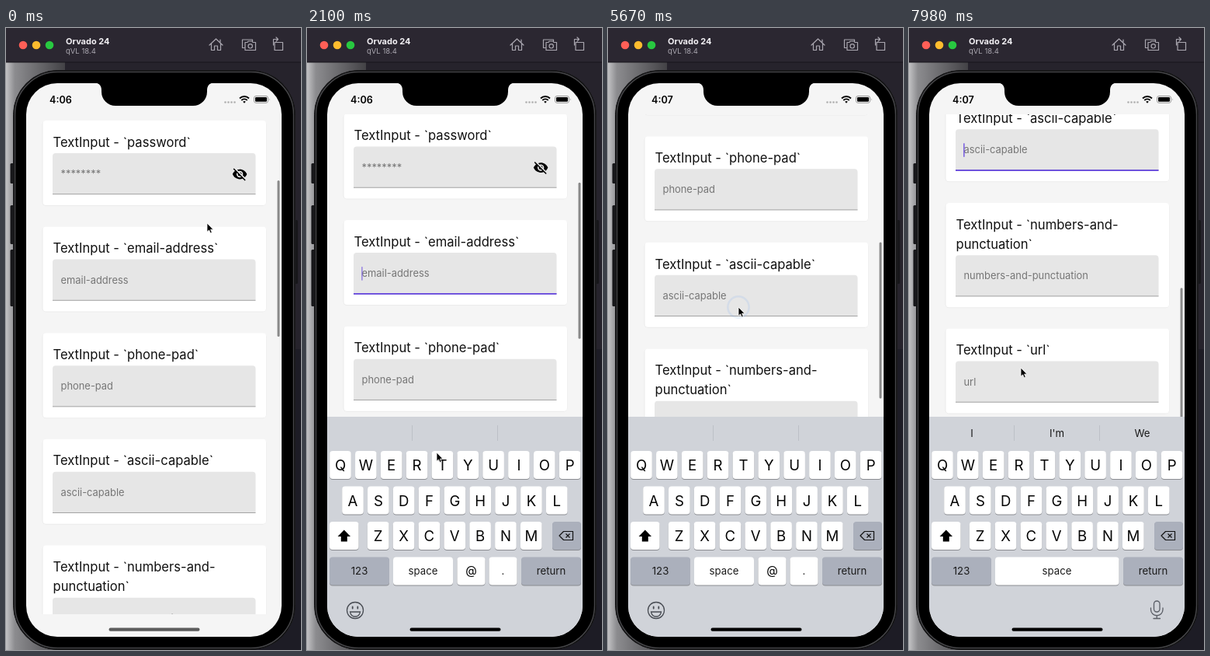
An HTML page for the animation above (8 s loop, 380 by 800 pixels).

```html
<!DOCTYPE html>
<html lang="en">
<head>
<meta charset="utf-8">
<title>Text input types</title>
<style>
  html, body { margin: 0; width: 100%; height: 100%; overflow: hidden; background: #1d1c25; }
  svg { display: block; width: 100vw; height: 100vh; }
  text { font-family: Inter, Roboto, sans-serif; }
  .title { font-size: 16.6px; fill: #111; }
  .hint { font-size: 12.9px; fill: #767676; }
  .letter { font-size: 18.6px; text-anchor: middle; fill: #050505; }
  .word { font-size: 13.2px; text-anchor: middle; fill: #1a1a1a; }
  .icon { fill: none; stroke: #aaa7b0; stroke-width: 1.2; stroke-linejoin: round; stroke-linecap: round; }
</style>
</head>
<body>
<svg viewBox="0 0 380 800">
  <defs>
    <linearGradient id="wall">
      <stop offset="0" stop-color="#c2c2c4"/><stop offset=".15" stop-color="#8c8c8f"/>
      <stop offset="1" stop-color="#434246"/>
    </linearGradient>
    <clipPath id="screen"><rect x="26" y="71" width="329" height="712" rx="40"/></clipPath>
    <clipPath id="list"><rect x="26" y="111" width="329" height="643"/></clipPath>
  </defs>

  <rect width="380" height="800" fill="#1d1c25"/>
  <rect width="76" height="800" fill="url(#wall)"/>
  <rect x="76" y="44" width="304" height="369" fill="#26232c"/>
  <rect width="380" height="44" fill="#2b2731"/>
  <path d="M0 44H380" stroke="#17151b"/>
  <circle cx="22" cy="22" r="5.300" fill="#ff5f57"/>
  <circle cx="39" cy="22" r="5.300" fill="#febc2e"/>
  <circle cx="56" cy="22" r="5.300" fill="#28c840"/>
  <text x="77" y="20.500" font-size="11" font-weight="700" fill="#f2f0f4">Orvado 24</text>
  <text x="77" y="32.500" font-size="9.500" fill="#aaa7b0">qVL 18.4</text>
  <g class="icon">
    <path d="M262 22L270.500 14L279 22M264.500 20V28.500H268.500V23H272.500V28.500H276.500V20M276 15V18"/>
    <path d="M307 25.500H304.500V15H317.500V17M308 18.500H311L312 17H317L318 18.500H321.500V28.500H308Z"/>
    <circle cx="314.700" cy="23.300" r="2.700"/>
    <path d="M346 18.500H356.500V28.500H346ZM344.500 22V14.500H350M348 12L350.500 14.500L348 17"/>
  </g>

  <g fill="#17171a">
    <rect x="5.500" y="174" width="6" height="26" rx="1.500"/>
    <rect x="5.500" y="228" width="6" height="50" rx="1.500"/>
    <rect x="5.500" y="285" width="6" height="73" rx="1.500"/>
    <rect x="370" y="247" width="6" height="82" rx="1.500"/>
  </g>
  <rect x="9.500" y="54.500" width="363" height="745" rx="57" fill="#000" stroke="#1c1c1e"/>
  <rect x="11.500" y="56.500" width="359" height="741" rx="55" fill="none" stroke="#464649" stroke-width="1.500"/>

  <g clip-path="url(#screen)">
    <rect x="26" y="71" width="329" height="712" fill="#f5f5f5"/>
    <g clip-path="url(#list)">
      <g id="cards"></g>
      <rect id="bar" x="349.500" width="3" height="201" rx="1.500" fill="#898989"/>
    </g>
    <g id="keyboard"></g>
    <rect id="home" x="132.500" y="771.600" width="117" height="4.200" rx="2.100"/>
    <path d="M111 70Q123 70 123 80V82A18 18 0 0 0 141 100H241A18 18 0 0 0 259 82V80Q259 70 271 70Z"/>
    <text id="clock" x="56" y="96.500" font-size="12.600" font-weight="600"></text>
    <g fill="#b0b0b0">
      <circle cx="282.500" cy="95.500" r="1.300"/><circle cx="286.500" cy="95.500" r="1.300"/>
      <circle cx="290.500" cy="95.500" r="1.300"/><circle cx="294.500" cy="95.500" r="1.300"/>
    </g>
    <g fill="none" stroke="#000" stroke-width="1.800">
      <path d="M301 90.500A8.500 8.500 0 0 1 313 90.500M303.300 93A5.300 5.300 0 0 1 310.700 93"/>
      <path d="M307 96.800L305.200 94.800Q307 93.400 308.800 94.800Z" fill="#000" stroke="none"/>
    </g>
    <rect x="319.500" y="87.500" width="18" height="8.800" rx="2.500" fill="none" stroke="#999"/>
    <rect x="321" y="89" width="15" height="5.800" rx="1.300"/>
    <path d="M339 90.300Q340.500 92 339 93.600Z" fill="#999"/>
  </g>

  <circle id="ring" fill="none" stroke="#82abf2" stroke-width="2.500"/>
  <path id="arrow" d="M0 0V11.200L2.600 8.900L4.300 12.800L6.300 12L4.600 8.200H8Z" stroke="#fff" stroke-width=".8"/>
</svg>

<script>
const LOOP = 8000;
const $ = id => document.getElementById(id);

// ---- cards ----
const EYE = `<path transform="translate(291 178) scale(.843)" d="M11.830 9L15 12.160V12a3 3 0 0 0-3-3h-.17m-4.300.8l1.550 1.550c-.05.210-.08.420-.08.650a3 3 0 0 0 3 3c.22 0 .44-.03.650-.08l1.550 1.550c-.67.330-1.410.530-2.200.530a5 5 0 0 1-5-5c0-.79.200-1.530.530-2.200M2 4.270l2.730 2.730C3.080 8.300 1.780 10 1 12c1.730 4.390 6 7.500 11 7.500 1.550 0 3.030-.3 4.380-.84l3.350 3.340L21 20.730 3.270 3M12 7a5 5 0 0 1 5 5c0 .64-.13 1.260-.36 1.820l2.930 2.930c1.500-1.250 2.700-2.890 3.430-4.750-1.730-4.390-6-7.500-11-7.500-1.400 0-2.740.250-4 .7l2.170 2.150C10.740 7.130 11.350 7 12 7z"/>`;

function card(type, y, { hint = type, lines = ['`' + type + '`'], extra = '' } = {}) {
  const top = y + 42 + (lines.length - 1) * 25.3;
  const titles = lines.map((s, i) =>
    `<text class="title" x="60.500" y="${y + 33.7 + i * 25.3}">${i ? '' : 'TextInput - '}${s}</text>`).join('');
  return `
    <rect x="46.500" y="${y}" width="289" height="${top - y + 68}" rx="5" fill="#ebebeb"/>
    <rect x="47.500" y="${y}" width="287.500" height="${top - y + 67}" rx="4" fill="#fff"/>
    ${titles}
    <path d="M60 ${top + 53}v-49q0-4 4-4h253.500q4 0 4 4v49z" fill="#e6e6e6"/>
    <path d="M60 ${top + 52.7}h261.500" stroke="#a3a3a3"/>
    <text class="hint" x="70.500" y="${top + 31}">${hint}</text>
    <g id="focus-${type}" fill="#5a38e0">
      <rect x="60" y="${top + 52}" width="261.500" height="1.600"/>
      <rect id="caret-${type}" x="70" y="${top + 18}" width="1.700" height="17.500"/>
    </g>${extra}`;
}

$('cards').innerHTML =
  card('password', 119, { hint: '********', extra: EYE }) +
  card('email-address', 255.6) +
  card('phone-pad', 392.2) +
  card('ascii-capable', 528.8) +
  card('numbers-and-punctuation', 665.4, { lines: ['`numbers-and-', 'punctuation`'] }) +
  card('url', 827);

// ---- keyboard ----
const cap = (x, y, w, fill = '#fff') =>
  `<rect x="${x}" y="${y + 1}" width="${w}" height="36" rx="4" fill="#8b8d92"/>
   <rect x="${x}" y="${y}" width="${w}" height="36" rx="4" fill="${fill}"/>`;
const label = (s, x, y, cls = 'word') => `<text class="${cls}" x="${x}" y="${y}">${s}</text>`;
const row = (s, x, y) => [...s].map((c, i) =>
  cap(x + i * 32.85 - 13.8, y, 27.6) + label(c, x + i * 32.85, y + 25, 'letter')).join('');
const GREY = '#abb0bc';

$('keyboard').innerHTML = `
  <rect x="26" y="500" width="329" height="300" fill="#d0d3d9"/>
  <path d="M135.500 511V531M245.500 511V531" stroke="#bcc0c7"/>
  ${row('QWERTYUIOP', 43, 544)}${row('ASDFGHJKL', 59, 589.5)}${row('ZXCVBNM', 91.7, 635)}
  ${cap(29, 635, 37.5)}${cap(316, 635, 37, GREY)}
  <path d="M47.800 645.500L56 654H51.800V660.500H43.800V654H39.600Z"/>
  <path d="M330.500 647.500H342.500V658.500H330.500L325 653ZM333.500 650.500L338.500 655.500M338.500 650.500L333.500 655.500" fill="none" stroke="#111" stroke-width="1.200" stroke-linejoin="round"/>
  ${cap(29, 680.5, 77, GREY)}${label('123', 67.5, 703)}
  ${cap(276, 680.5, 77, GREY)}${label('return', 314.5, 702.5)}
  <g id="emailKeys">
    ${cap(111, 680.5, 77)}${label('space', 149.5, 702.5)}
    ${cap(193.5, 680.5, 36)}<text x="211.500" y="703" font-size="15" text-anchor="middle">@</text>
    ${cap(234.5, 680.5, 36)}${label('.', 252.5, 703)}
    <g fill="none" stroke="#484c53" stroke-width="1.300">
      <circle cx="62" cy="749" r="10.500"/>
      <path d="M55.500 751H68.500Q67.500 757 62 757T55.500 751Z"/>
      <path d="M58.700 744.500V746.500M65.300 744.500V746.500" stroke-width="1.800" stroke-linecap="round"/>
    </g>
  </g>
  <g id="plainKeys">
    ${cap(111, 680.5, 159.5)}${label('space', 190.5, 702.5)}
    <g fill="none" stroke="#5a5e66" stroke-width="1.300" stroke-linecap="round">
      <rect x="315.500" y="737" width="7.500" height="14" rx="3.700"/>
      <path d="M311.500 746V748A7.700 7.700 0 0 0 327 748V746M319.200 756V759M315 759.500H323.500"/>
    </g>
  </g>
  <g id="words">${label('I', 81, 526)}${label("I'm", 190.5, 526)}${label('We', 300.5, 526)}</g>`;

// ---- motion ----
const clamp = v => Math.max(0, Math.min(1, v));
const ramp = (t, a, b) => clamp((t - a) / (b - a));
const smooth = u => u * u * (3 - 2 * u);
const show = (id, v) => $(id).setAttribute('opacity', +v);

// time, x, y
const PATH = [
  [0, 259, 251], [750, 143, 327], [1450, 143, 327], [2080, 167, 546], [2500, 168, 552],
  [3500, 177, 412], [3807, 177, 412], [4750, 179, 155], [4900, 179, 155], [5480, 168, 359],
  [5900, 168, 359], [6550, 178, 411], [6900, 178, 411], [7400, 176, 215], [7920, 144, 437], [LOOP, 144, 437]
];
const PRESSES = [[780, 900], [3760, 4780], [5645, 5790], [6860, 7420]];
const EMAIL = 930, ASCII = 5820;

function cursor(t) {
  const i = Math.max(1, PATH.findIndex(p => p[0] >= t));
  const a = PATH[i - 1], b = PATH[i], u = smooth(ramp(t, a[0], b[0]));
  return [a[1] + (b[1] - a[1]) * u, a[2] + (b[2] - a[2]) * u];
}

const scrollAt = t => 8.5 * (1 - Math.exp(-t / 300))
  + 244.5 * smooth(ramp(t, 3807, 4750))
  + 187.5 * smooth(ramp(t, 6900, 7400));

function rise(t) {
  const s = Math.max(0, t - EMAIL) * .0113;
  return 290 * (1 + s) * Math.exp(-s);
}

function blink(t) {
  const p = (t % 1000) / 1000;
  return ramp(p, -.05, .25) * (1 - ramp(p, .5, .6)) + ramp(p, .95, 1.25);
}

function draw(t) {
  const scroll = scrollAt(t), plain = t >= ASCII + 60;
  $('cards').setAttribute('transform', `translate(0 ${-scroll})`);
  $('bar').setAttribute('y', 196 + .314 * scroll);
  show('bar', t < 3807 ? 1 - ramp(t, 2200, 2450) : t < 6900 ? 1 - ramp(t, 5690, 5950) : 1);

  for (const type of ['password', 'phone-pad', 'numbers-and-punctuation', 'url']) show('focus-' + type, 0);
  show('focus-email-address', t >= EMAIL && t < ASCII);
  show('focus-ascii-capable', t >= ASCII);
  show('caret-email-address', blink(t - EMAIL - 70 + LOOP));
  show('caret-ascii-capable', blink(t - ASCII + LOOP));

  $('keyboard').setAttribute('transform', `translate(0 ${rise(t)})`);
  show('emailKeys', !plain);
  show('plainKeys', plain);
  show('words', t >= ASCII + 200);
  $('home').setAttribute('fill', t < EMAIL + 100 ? '#5c5c5c' : '#000');
  $('clock').textContent = t < 5000 ? '4:06' : '4:07';

  const [x, y] = cursor(t), [rx, ry] = cursor(Math.max(0, t - 25));
  $('arrow').setAttribute('transform', `translate(${x} ${y})`);
  const press = Math.max(...PRESSES.map(([a, b]) => ramp(t, a, a + 150) * (1 - ramp(t, b, b + 150))));
  $('ring').setAttribute('cx', rx);
  $('ring').setAttribute('cy', ry);
  $('ring').setAttribute('r', 12 + 9.5 * press);
  show('ring', press);
}

function frame() {
  draw(performance.now() % LOOP);
  requestAnimationFrame(frame);
}
frame();
</script>
</body>
</html>
```
